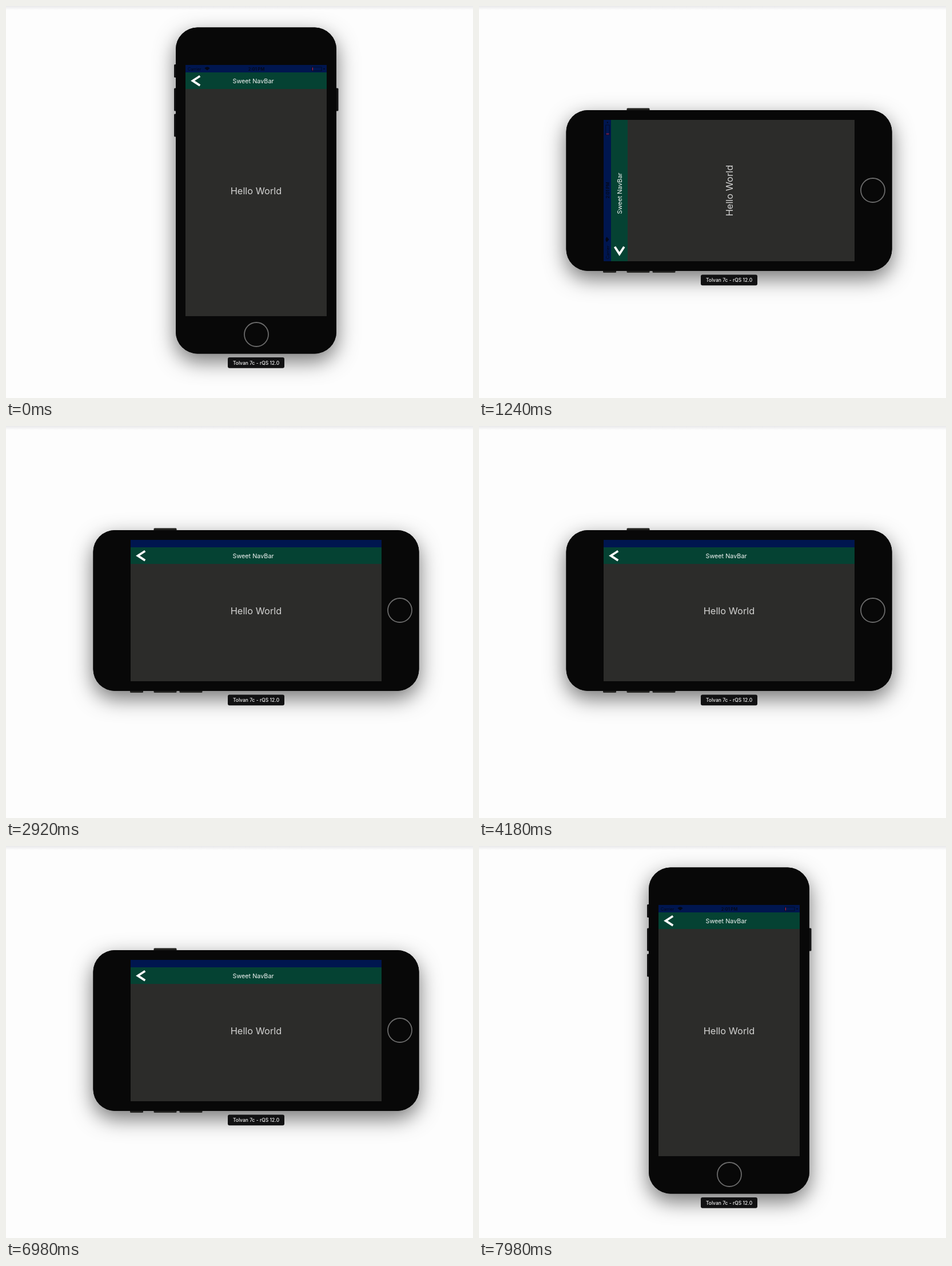
These frames come from a looping animation (817 by 685 pixels, 8000 ms). An HTML page with a canvas:

```html
<!DOCTYPE html>
<html lang="en">
<head>
<meta charset="utf-8">
<title>Rotating phone</title>
<style>
  html, body { margin: 0; width: 100%; height: 100%; overflow: hidden; background: #fdfdfd; }
  canvas { display: block; }
</style>
</head>
<body>
<canvas id="stage" width="817" height="685"></canvas>
<script>
const ctx = document.getElementById('stage').getContext('2d');
const LOOP = 8000;
const CX = 437.5, CY = 322.5;
const SHORT = 247, LONG = 439;
const FONT = 'Inter, "Open Sans", sans-serif';

// The device flips at once; its content turns a little later.
const TO_LANDSCAPE = { flip: 690, turn: 1192 };
const TO_PORTRAIT = { flip: 6970, turn: 7475 };
const TURN_TIME = 400;

const lerp = (a, b, p) => a + (b - a) * p;
const clamp = v => Math.min(1, Math.max(0, v));
const ease = p => (1 - Math.cos(Math.PI * clamp(p))) / 2;

// Playback holds pictures for 100, 20 and 20 ms; the motion itself is evenly sampled.
function sampleTime(t) {
  const cycle = Math.floor((t - 20) / 140);
  const phase = t - 20 - cycle * 140;
  const index = phase < 100 ? 0 : phase < 120 ? 1 : 2;
  return 20 + 140 * (cycle + index / 3);
}

function poseAt(t) {
  const turned = move => ease((t - move.turn) / TURN_TIME);
  if (t < TO_LANDSCAPE.flip) return { landscape: false, angle: 0, wide: 0 };
  if (t < TO_PORTRAIT.flip) {
    const p = turned(TO_LANDSCAPE);
    return { landscape: true, angle: -90 * (1 - p), wide: p };
  }
  const p = turned(TO_PORTRAIT);
  return { landscape: false, angle: 90 * (1 - p), wide: 1 - p };
}

function rect(x, y, w, h, color) {
  ctx.fillStyle = color;
  ctx.fillRect(x, y, w, h);
}

function roundRect(x, y, w, h, r, color) {
  ctx.fillStyle = color;
  ctx.beginPath();
  ctx.roundRect(x, y, w, h, r);
  ctx.fill();
}

function text(str, x, y, size, color, weight = 400, align = 'center') {
  ctx.font = `${weight} ${size}px ${FONT}`;
  ctx.textAlign = align;
  ctx.textBaseline = 'alphabetic';
  ctx.fillStyle = color;
  ctx.fillText(str, x, y);
}

function drawBackground() {
  rect(0, 0, 817, 685, '#fdfdfd');
  const g = ctx.createLinearGradient(0, 0, 0, 7);
  g.addColorStop(0, '#e8e8ea');
  g.addColorStop(1, '#fdfdfd');
  rect(0, 0, 817, 7, g);
}

function drawDevice(landscape) {
  ctx.save();
  ctx.translate(CX, CY);
  if (landscape) ctx.rotate(-Math.PI / 2);

  ctx.save();
  ctx.shadowColor = 'rgba(0,0,0,0.55)';
  ctx.shadowBlur = 36;
  ctx.shadowOffsetY = 13;
  roundRect(-140.5, -285, 281, 570, 38, '#080808');
  ctx.restore();

  const button = landscape ? '#232321' : '#121213';
  roundRect(-143.5, -220.5, 6, 23, 1.5, button);
  roundRect(-143.5, -179, 6, 40, 1.5, button);
  roundRect(-143.5, -134, 6, 40, 1.5, button);
  roundRect(138, -179, 6, 40, 1.5, button);
  roundRect(-140.5, -285, 281, 570, 38, '#080808');

  ctx.strokeStyle = '#6b6b6b';
  ctx.lineWidth = 1.8;
  ctx.beginPath();
  ctx.arc(0.5, 251.5, 21, 0, Math.PI * 2);
  ctx.stroke();

  rect(-SHORT / 2, -LONG / 2, SHORT, LONG, '#000');
  ctx.restore();
}

function drawStatus(left, top, right, alpha) {
  const ink = '#040816';
  const base = top + 9.5;
  ctx.globalAlpha = alpha;
  text('Carrier', left + 4, base, 7.2, ink, 400, 'left');
  text('2:01 PM', 0.5, base, 7.4, ink, 600);

  // Wireless signal
  ctx.fillStyle = ink;
  ctx.beginPath();
  ctx.moveTo(left + 38, base);
  ctx.arc(left + 38, base, 6, -Math.PI * 0.78, -Math.PI * 0.22);
  ctx.fill();

  // Nearly empty battery
  ctx.strokeStyle = ink;
  ctx.lineWidth = 0.7;
  ctx.strokeRect(right - 26, top + 3.8, 17, 6.4);
  rect(right - 25.2, top + 4.5, 1.2, 5, '#c0203a');
  rect(right - 5.5, top + 5.8, 2, 2, ink);
  ctx.globalAlpha = 1;
}

function drawScreen({ landscape, angle, wide }) {
  const w = lerp(SHORT, LONG, wide), h = lerp(LONG, SHORT, wide);
  const left = -w / 2, top = -h / 2;
  ctx.save();
  ctx.translate(CX, CY);
  ctx.beginPath();
  if (landscape) ctx.rect(-LONG / 2, -SHORT / 2, LONG, SHORT);
  else ctx.rect(-SHORT / 2, -LONG / 2, SHORT, LONG);
  ctx.clip();
  ctx.rotate(angle * Math.PI / 180);

  rect(left, top, w, h, '#2c2c2a');
  rect(left, top, w, 13.5, '#00164f');
  rect(left, top + 13, w, 29, '#054233');

  const alpha = clamp(1 - wide * 2);
  if (alpha > 0) drawStatus(left, top, -left, alpha);

  ctx.strokeStyle = '#fff';
  ctx.lineWidth = 3.8;
  ctx.beginPath();
  ctx.moveTo(left + 25.3, top + 19.5);
  ctx.lineTo(left + 12.6, top + 27.7);
  ctx.lineTo(left + 25.3, top + 35.9);
  ctx.stroke();

  text('Sweet NavBar', -5, top + 31.7, 10.8, '#f4f6f5');
  text('Hello World', 0, 6.2, 16.4, '#d2d2d1');
  ctx.restore();
}

function drawLabel(landscape) {
  const y = landscape ? 469.5 : 614;
  roundRect(388, y, 99, 18.7, 3, '#111112');
  text('Tolvan 7c - rQS 12.0', CX, y + 12.9, 8.5, '#f2f2f2', 500);
}

function draw(now) {
  const pose = poseAt(sampleTime(now % LOOP));
  drawBackground();
  drawDevice(pose.landscape);
  drawScreen(pose);
  drawLabel(pose.landscape);
}

let start;
function tick(now) {
  start ??= now;
  draw(now - start);
  requestAnimationFrame(tick);
}
requestAnimationFrame(tick);
</script>
</body>
</html>
```
